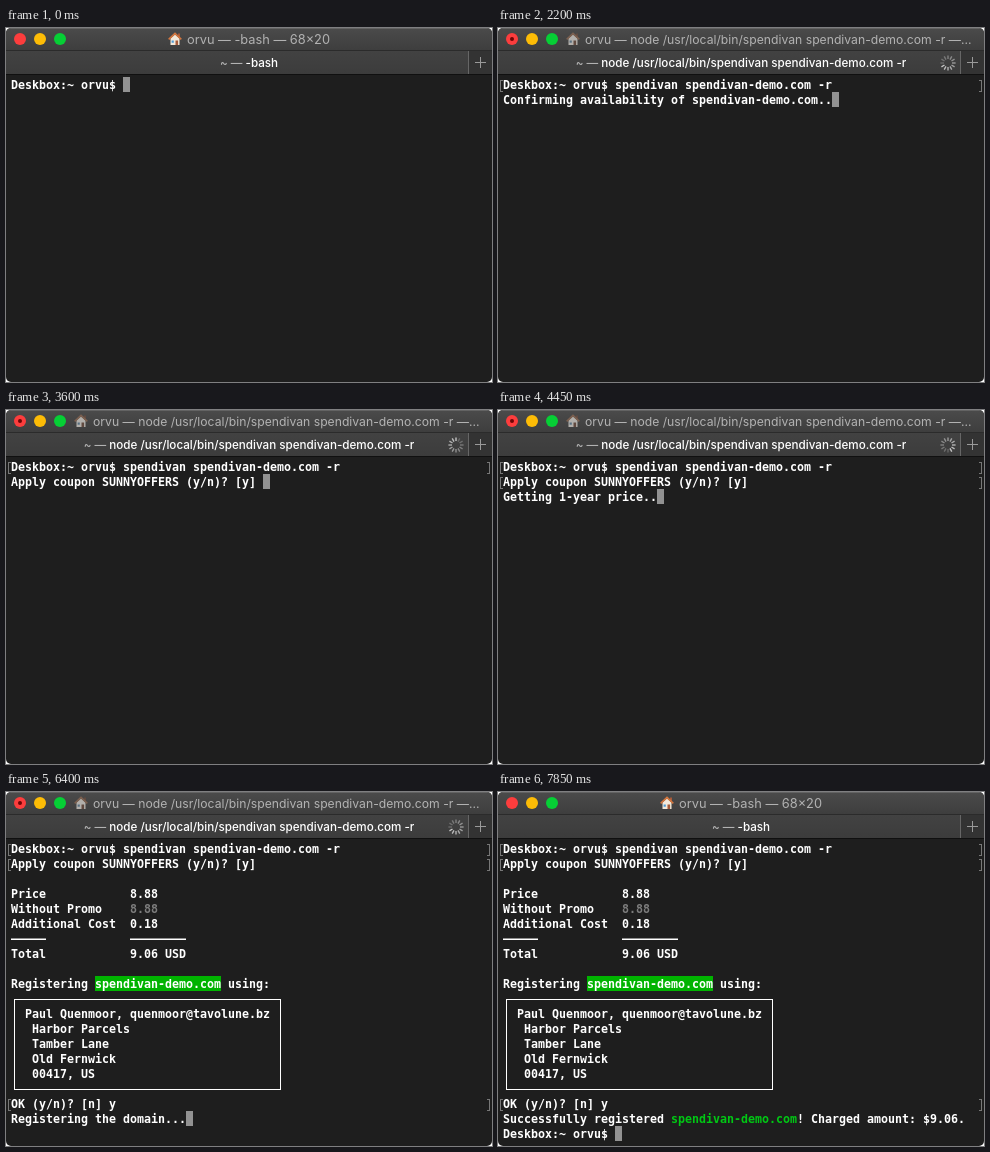
An HTML page for the animation above (8 s loop, 486 by 354 pixels).

```html
<!DOCTYPE html>
<html lang="en">
<head>
<meta charset="utf-8">
<title>Terminal session</title>
<style>
  html, body { margin: 0; width: 100%; height: 100%; overflow: hidden; background: #fff; }
  #window { position: relative; width: 486px; height: 354px; overflow: hidden; border-radius: 5px; background: #1e1e1e; }
  #window > * { position: absolute; }
  .bar { left: 0; width: 486px; box-sizing: border-box; }
  #titlebar { top: 0; height: 23px; background: linear-gradient(#4a4a4a, #3e3e3e); border-top: 1px solid #636363; border-bottom: 1px solid #2b2b2b; }
  #tabbar { top: 23px; height: 24px; background: linear-gradient(#424242, #3c3c3c); border-bottom: 1px solid #101010; }
  .light { top: 5px; width: 12px; height: 12px; border-radius: 50%; }
  #busyDot { left: 12px; top: 9px; width: 4px; height: 4px; border-radius: 50%; background: #6d0505; }
  #title, #tab { font-family: Inter, sans-serif; white-space: pre; }
  #title { top: 2px; line-height: 19px; color: #b2b2b2; }
  #house { top: 4px; }
  #tab { top: 26px; left: 0; width: 486px; text-align: center; font-size: 11.65px; line-height: 19px; color: #fff; font-weight: 500; }
  #tab i { font-style: normal; color: #b2b2b2; }
  #newTab { left: 462px; top: 23px; width: 23px; height: 23px; background: #333; border-left: 1px solid #666; }
  #plus { left: 469px; top: 29px; }
  #spinner { left: 442px; top: 27px; }
  #text { margin: 0; left: 5px; top: 50px; color: #fff; font: bold 11.63px/15px "DejaVu Sans Mono", monospace; }
  #text b { display: inline-block; height: 14px; margin-top: -1px; padding-top: 1px; background: #00b300; vertical-align: top; }
  #text em { font-style: normal; color: #00c814; }
  #text s { text-decoration: none; color: #7c7c7c; }
  #cursor { width: 7px; height: 15px; background: #929292; }
  #frame { left: 8px; top: 207px; width: 265px; height: 89px; border: 1px solid #fff; }
  .mark { left: 2px; width: 479px; height: 12px; }
  .mark::before, .mark::after { content: ""; position: absolute; top: 0; width: 2px; height: 10px; border: 1px solid #777; }
  .mark::before { left: 0; border-right: 0; }
  .mark::after { left: 479px; border-left: 0; }
</style>
</head>
<body>
<div id="window">
  <div id="titlebar" class="bar"></div>
  <div id="tabbar" class="bar"></div>
  <div class="light" style="left:8px;background:#fc3d3d"></div>
  <div class="light" style="left:28px;background:#fdbc06"></div>
  <div class="light" style="left:48px;background:#06cf35"></div>
  <div id="busyDot"></div>
  <svg id="house" width="14" height="14">
    <path d="M2.5 6.5 7 2.5l4.5 4V13h-9z" fill="#f3e9da"/>
    <path d="M10 1.5h2v4h-2z" fill="#a65a3a"/>
    <path d="M.7 7.3 7 1.4l6.3 5.9" fill="none" stroke="#d3763f" stroke-width="1.7"/>
    <path d="M3.6 8.5h2.2v2.2H3.6z" fill="#4d9bd6"/>
    <path d="M7.5 8.5h2.6V13H7.5z" fill="#a65a3a"/>
  </svg>
  <div id="title"></div>
  <div id="tab"></div>
  <div id="newTab"></div>
  <svg id="plus" width="11" height="11"><path d="M0 5.5h11M5.5 0v11" stroke="#9a9a9a"/></svg>
  <svg id="spinner" width="16" height="16" viewBox="-8 -8 16 16" stroke="#c4c4c4" stroke-width="1.4"></svg>
  <div id="cursor"></div>
  <pre id="text"></pre>
  <div id="frame"></div>
  <div class="mark" style="top:52px"></div>
  <div class="mark" style="top:67px"></div>
  <div class="mark" style="top:307px"></div>
</div>
<script>
const $ = id => document.getElementById(id);
const LOOP = 8000, SPOKES = 12;
const USER = "orvu", APP = "spendivan", SITE = APP + "-demo.com";
const PROMPT = `Deskbox:~ ${USER}$ `;
const COMMAND = `${APP} ${SITE} -r`;
const RUNNING = `node /usr/local/bin/${COMMAND}`;

// Moments of the session, in ms
const AT = {
  run: 1900, confirm: 1950, check: 2800, coupon: 3400, couponOk: 3950, pricing: 4000,
  table: 4700, address: 5100, yes: 5450, quiet: 5500, accept: 5650, register: 5850, done: 7850
};

// Bursts of typing: start, end, first and last character count
const BURSTS = [[200, 700, 0, 10], [850, 1350, 10, 24], [1550, 1850, 24, 31]];

const TABLE = [
  "",
  "Price            8.88",
  "Without Promo    <s>8.88</s>",
  "Additional Cost  0.18",
  "–––––            ––––––––",
  "Total            9.06 USD",
  "",
  `Registering <b>${SITE}</b> using:`
];
const ADDRESS = [
  "",
  "  Paul Quenmoor, quenmoor@tavolune.bz",
  "   Harbor Parcels",
  "   Tamber Lane",
  "   Old Fernwick",
  "   00417, US",
  ""
];

function typedCount(t) {
  let count = 0;
  for (const [start, end, from, to] of BURSTS) {
    if (t < start) break;
    const progress = Math.min(1, (t - start) / (end - start));
    count = from + 1 + Math.floor(progress * (to - from - 1));
  }
  return count;
}

const loading = (label, t, start) =>
  label + ".".repeat((1 + Math.floor((t - start) / 250)) % 4);

function screenLines(t) {
  const lines = [PROMPT + COMMAND.slice(0, typedCount(t))];
  if (t < AT.run) return lines;
  if (t < AT.confirm) return [...lines, ""];
  if (t < AT.check) return [...lines, loading(`Confirming availability of ${SITE}`, t, AT.confirm)];
  if (t < AT.coupon) return [...lines, loading("Checking coupons", t, AT.check)];

  lines.push("Apply coupon SUNNYOFFERS (y/n)? [y] ");
  if (t < AT.couponOk) return lines;
  if (t < AT.pricing) return [...lines, ""];
  if (t < AT.table) return [...lines, loading("Getting 1-year price", t, AT.pricing)];

  lines.push(...TABLE);
  if (t < AT.address) return lines;

  lines.push(...ADDRESS, "OK (y/n)? [n] " + (t >= AT.yes ? "y" : ""));
  if (t < AT.accept) return lines;
  if (t < AT.register) return [...lines, ""];
  if (t < AT.done) return [...lines, loading("Registering the domain", t, AT.register)];
  return [...lines, `Successfully registered <em>${SITE}</em>! Charged amount: $9.06.`, PROMPT];
}

const show = (element, visible) => { element.style.display = visible ? "" : "none"; };

function setHTML(element, html) {
  if (element.shown === html) return;
  element.shown = html;
  element.innerHTML = html;
}

function drawTitle(busy) {
  const left = busy ? 68 : 162;
  $("house").style.left = left + "px";
  $("house").style.filter = busy ? "grayscale(.6) brightness(.75)" : "none";
  $("title").style.left = left + 19 + "px";
  $("title").style.fontSize = busy ? "12.2px" : "12.8px";
  setHTML($("title"), `${USER} — ` + (busy ? `${RUNNING} —…` : "-bash — 68×20"));
  setHTML($("tab"), "<i>~ — </i>" + (busy ? RUNNING : "-bash"));
  show($("busyDot"), busy);
}

const spokes = Array.from({ length: SPOKES }, (_, i) => {
  const spoke = document.createElementNS($("spinner").namespaceURI, "line");
  spoke.setAttribute("y1", -4);
  spoke.setAttribute("y2", -7.6);
  spoke.setAttribute("transform", `rotate(${i * 360 / SPOKES})`);
  return $("spinner").appendChild(spoke);
});

function drawSpinner(t) {
  const head = Math.floor(t / 50);
  show($("spinner"), (t >= AT.confirm && t < AT.quiet) || (t >= AT.accept && t < AT.done));
  spokes.forEach((spoke, i) => {
    const age = (head - i + SPOKES) % SPOKES;
    spoke.setAttribute("opacity", 1 - 0.7 * age / (SPOKES - 1));
  });
}

function drawScreen(t) {
  const lines = screenLines(t);
  const column = lines[lines.length - 1].replace(/<[^>]*>/g, "").length;
  setHTML($("text"), lines.join("\n"));
  $("cursor").style.left = 5 + 7 * column + "px";
  $("cursor").style.top = 49 + 15 * (lines.length - 1) + "px";
  show($("frame"), t >= AT.address);
  const entered = [AT.run, AT.couponOk, AT.accept];
  document.querySelectorAll(".mark").forEach((mark, i) => show(mark, t >= entered[i]));
}

const startTime = performance.now();
function tick() {
  const t = (performance.now() - startTime) % LOOP;
  drawTitle(t >= AT.run && t < AT.done);
  drawSpinner(t);
  drawScreen(t);
  requestAnimationFrame(tick);
}
tick();
</script>
</body>
</html>
```
